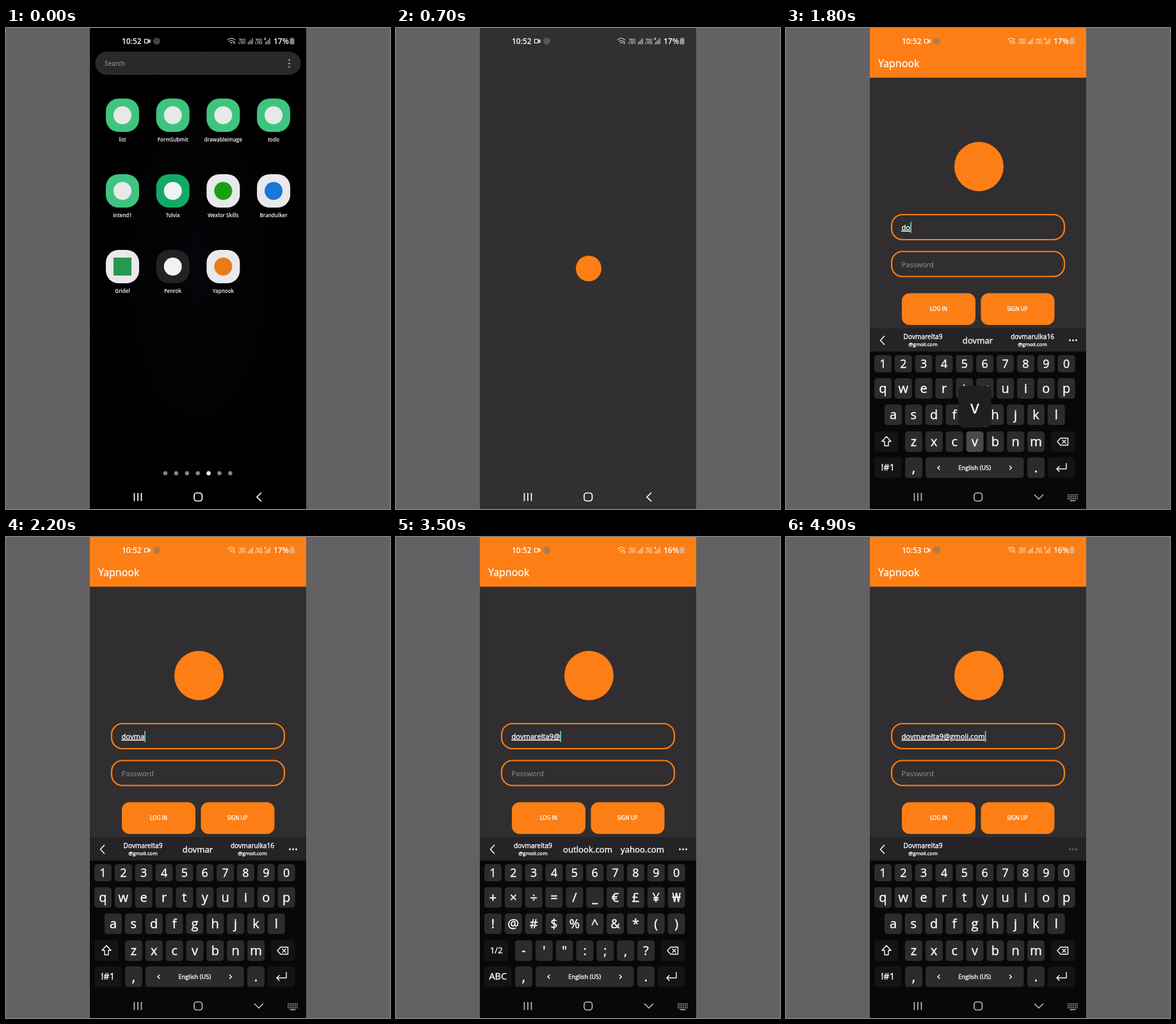
Write an HTML page that moves like this. It is 600 px wide and 750 px high and loops after 5 s.

```html
<!DOCTYPE html>
<html lang="en">
<head>
<meta charset="utf-8">
<title>Login demo</title>
<style>
  html, body { margin: 0; width: 100%; height: 100%; overflow: hidden; background: #636163; }
  svg { display: block; width: 600px; height: 750px; font-family: "Open Sans", "Noto Sans", sans-serif; fill: #fff; }
  .mid { text-anchor: middle; }
  .medium text, text.medium { stroke: #fff; stroke-width: .35; }
  .line { fill: none; stroke: #fff; stroke-linecap: round; stroke-linejoin: round; }
  .orange { fill: #fd7e14; }
  .hint { fill: #979699; }
  .field { fill: none; stroke: #fd7e14; stroke-width: 2.2; }
  .key { fill: #2c2c2f; }
  .key.dark { fill: #141416; }
  .key.down { fill: #4a4a4d; }

  #home, #splash, #splashDot, #login, #keyboard, #nav, #backArrow, #downArrow {
    animation: 5s linear infinite;
  }
  #home { transform-origin: 300px 375px; animation-name: recede; }
  #splash { animation-name: open; }
  #splashDot { animation-name: settle; }
  #login { animation-name: appear; }
  #keyboard { animation-name: rise; }
  #nav { animation-name: soften; }
  #backArrow { animation-name: untilKeyboard; }
  #downArrow { animation-name: withKeyboard; }

  @keyframes recede {
    0%, 4% { transform: none; opacity: 1; }
    10% { transform: scale(.983); opacity: .71; }
    12%, 100% { transform: scale(.97); opacity: .5; }
  }
  @keyframes open {
    0%, 6% { x: 313.5px; y: 346px; width: 52px; height: 52px; rx: 20px; opacity: 0; }
    7% { opacity: 1; }
    10% { x: 253px; y: 299px; width: 147px; height: 147px; rx: 58px; }
    12%, 100% { x: 131px; y: 0; width: 338px; height: 750px; rx: 0; opacity: 1; }
  }
  @keyframes settle {
    0%, 6% { cx: 339.5px; cy: 372px; r: 5px; opacity: 0; }
    7% { opacity: 1; }
    10% { cx: 327px; cy: 373px; r: 9px; }
    12% { cx: 301px; cy: 375px; r: 16px; }
    14%, 100% { cx: 301px; cy: 375px; r: 20px; opacity: 1; }
  }
  @keyframes appear {
    0%, 17% { opacity: 0; }
    22%, 100% { opacity: 1; }
  }
  @keyframes rise {
    0%, 26.2% { transform: translateY(284px); }
    27.2%, 100% { transform: none; }
  }
  @keyframes soften {
    0%, 17% { opacity: 1; }
    20%, 100% { opacity: .72; }
  }
  @keyframes untilKeyboard {
    0%, 27.1% { opacity: 1; }
    27.2%, 100% { opacity: 0; }
  }
  @keyframes withKeyboard {
    0%, 27.1% { opacity: 0; }
    27.2%, 100% { opacity: 1; }
  }
</style>
</head>
<body>
<svg viewBox="0 0 600 750">
  <defs>
    <clipPath id="screen"><rect x="131" width="338" height="750"/></clipPath>
    <radialGradient id="night"><stop stop-color="#050509"/><stop offset="1" stop-color="#000"/></radialGradient>
  </defs>
  <rect width="600" height="750" fill="#636163"/>
  <g clip-path="url(#screen)">
    <rect x="131" width="338" height="750" fill="url(#night)"/>

    <g id="home">
      <rect x="139.5" y="37" width="321" height="36" rx="18" fill="#29282b"/>
      <text x="154" y="58.5" font-size="9.8" font-weight="600" fill="#8b8a8d">Search</text>
      <g fill="#aaa"><circle cx="442.5" cy="50" r="1.3"/><circle cx="442.5" cy="55.3" r="1.3"/><circle cx="442.5" cy="60.6" r="1.3"/></g>
      <g id="apps" class="mid" font-size="8" font-weight="600"></g>
      <g id="dots"></g>
    </g>

    <rect id="splash" fill="#312f32"/>
    <circle id="splashDot" class="orange"/>

    <g id="login">
      <rect x="131" width="338" height="750" fill="#302e30"/>
      <rect x="131" width="338" height="77.5" class="orange"/>
      <rect x="131" y="711" width="338" height="39" fill="#000"/>
      <text class="medium" x="144" y="61" font-size="16">Yapnook</text>
      <circle cx="301.5" cy="216" r="38.5" class="orange"/>
      <rect class="field" x="165" y="291" width="270" height="39" rx="17"/>
      <rect class="field" x="165" y="348.5" width="270" height="39" rx="17"/>
      <text id="emailHint" class="hint" x="180.5" y="315" font-size="11.5">Email</text>
      <text id="email" class="medium" x="180.5" y="315" font-size="11.2" text-decoration="underline"></text>
      <rect id="cursor" y="302.5" width="1.6" height="17" fill="#80d6c8"/>
      <text class="hint" x="180.5" y="372.5" font-size="11.2">Password</text>
      <g class="mid medium" font-size="8.2">
        <rect class="orange" x="181" y="413.5" width="115" height="49.5" rx="12"/>
        <rect class="orange" x="304.5" y="413.5" width="115" height="49.5" rx="12"/>
        <text x="238.5" y="441">LOG IN</text>
        <text x="361.5" y="441">SIGN UP</text>
      </g>
    </g>

    <g id="keyboard" class="mid medium">
      <rect x="131" y="468" width="338" height="282" fill="#08080a"/>
      <rect x="131" y="468" width="338" height="36.5" fill="#242426"/>
      <path id="stripBack" class="line" stroke-width="1.5" d="M153.5 480.5l-6 6.5 6 6.5"/>
      <g id="more"><circle cx="443.5" cy="487" r="1.4"/><circle cx="448.5" cy="487" r="1.4"/><circle cx="453.5" cy="487" r="1.4"/></g>
      <g id="suggestions"></g>
      <g id="letters"></g>
      <g id="symbols"></g>
      <g id="popup">
        <rect x="-25.5" width="51" height="65" rx="8" fill="#1f1f21"/>
        <text id="popupText" y="43" font-size="27"></text>
      </g>
    </g>

    <g id="status" font-weight="600">
      <text id="clock" x="181" y="25" font-size="12"></text>
      <path class="line" stroke-width="1.2" d="M216.5 17.5h5.5v6h-5.5zM222.5 20l2.5-1.7v4.4l-2.5-1.7"/>
      <circle cx="235.5" cy="20.5" r="5.5" fill="#777" opacity=".55"/>
      <g opacity=".88">
        <path class="line" stroke-width="1.1" d="M346.5 18.3q5.5-4.6 11 0M348.5 20.9q3.5-2.9 7 0M350.6 23.2q1.4-1.2 2.8 0"/>
        <path d="M355 22.5l1.5-2 1.5 2zM355 23.3h3l-1.5 2z"/>
        <path class="line" stroke-width="1" stroke-linecap="butt" d="M378.5 25v-2.5M380.7 25v-4.5M382.9 25v-6.5M385.1 25v-9M405.5 25v-2.5M407.7 25v-4.5M409.9 25v-6.5M412.1 25v-9"/>
      </g>
      <g class="mid" font-size="5.2">
        <text x="369" y="19.5">Vo))</text><text x="369" y="25.2">LTE1</text>
        <text x="395" y="19.5">Vo))</text><text x="395" y="25.2">LTE2</text>
        <text x="405" y="18.5">R</text>
      </g>
      <text id="battery" x="418" y="25" font-size="12"></text>
      <path fill="#ccc" opacity=".65" d="M443.5 16.5h2v-1.5h3v1.5h2v9h-7z"/>
    </g>

    <g id="nav" class="line" stroke-width="1.7">
      <path stroke-linecap="butt" d="M200.5 725v12.5M206 725v12.5M211.5 725v12.5"/>
      <rect x="294" y="725" width="12.5" height="12.5" rx="4"/>
      <path id="backArrow" d="M398.5 725l-6.5 6.3 6.5 6.3"/>
      <g id="downArrow">
        <path d="M388.5 728l6.5 6.5 6.5-6.5"/>
        <path stroke-width="1.6" stroke-linecap="butt" stroke-dasharray="1.7 1.1" d="M440 728h16M440 731h16M440 734h16"/>
        <path stroke-width="1.3" d="M444 737h8"/>
      </g>
    </g>
  </g>
</svg>
<script>
const $ = id => document.getElementById(id);

function add(parent, tag, attrs, text = '') {
  const node = document.createElementNS('http://www.w3.org/2000/svg', tag);
  for (const name in attrs) node.setAttribute(name, attrs[name]);
  node.textContent = text;
  return parent.appendChild(node);
}

// Home screen: label, tile colour, badge colour
const green = ['#3fc480', '#e6e9e7'];
const white = '#e9e9eb';
const apps = [
  ['list', ...green], ['FormSubmit', ...green], ['drawableimage', ...green], ['todo', ...green],
  ['intend1', ...green], ['Tolvix', '#13aa68', '#f0f3f1'], ['Wexlor Skills', white, '#18a012'],
  ['Brandulker', white, '#1878d8'], ['Gridel', white, '#27984f'], ['Fenrok', '#222225', '#f2f2f2'],
  ['Yapnook', white, '#ec7a1c']
];
apps.forEach(([label, tile, badge], i) => {
  const x = 182 + (i % 4) * 78.7, y = 136 + Math.floor(i / 4) * 118;
  add($('apps'), 'rect', { x: x - 26, y: y - 26, width: 52, height: 52, rx: 20, fill: tile });
  if (label === 'Gridel') add($('apps'), 'rect', { x: x - 14, y: y - 14, width: 28, height: 28, fill: badge });
  else add($('apps'), 'circle', { cx: x, cy: y, r: 14, fill: badge });
  add($('apps'), 'text', { x, y: y + 40.5 }, label);
});
for (let i = 0; i < 7; i++) {
  add($('dots'), 'circle', { cx: 249 + i * 16.9, cy: 694.3, r: 3.2, fill: i === 4 ? '#fff' : '#858587' });
}

// Keyboard pages
const pages = { letters: {}, symbols: {} };

function addKey(page, label, x, y, width, height, size, dark) {
  const cx = x + width / 2;
  const rect = add($(page), 'rect', { class: dark ? 'key dark' : 'key', x, y, width, height, rx: 4.5 });
  add($(page), 'text', { x: cx, y: y + height / 2 + size * .34, 'font-size': size }, label);
  pages[page][label] = { rect, cx, y };
}

function addRow(page, labels, x, y, height, size) {
  [...labels].forEach((label, i) => addKey(page, label, x + i * 31.85, y, 27, height, size));
}

function addIcon(page, d) {
  add($(page), 'path', { class: 'line', 'stroke-width': 1.4, d });
}

function buildPage(page, rows, thirdX, toggle) {
  addRow(page, '1234567890', 138, 510, 27, 18);
  addRow(page, rows[0], 138, 546, 32, 20);
  addRow(page, rows[1], thirdX, 587, 32, 20);
  addKey(page, page === 'symbols' ? '1/2' : '', 138, 629, 37.5, 32, 13, true);
  addRow(page, rows[2], 186, 629, 32, 20);
  addKey(page, ' ', 414, 629, 37.5, 32, 12, true);
  addKey(page, toggle, 138, 669.5, 42.5, 32, 14.5, true);
  addKey(page, ',', 186, 669.5, 27, 32, 22);
  addKey(page, 'English (US)', 218, 669.5, 153.5, 32, 9.4);
  addKey(page, '.', 377, 669.5, 27, 32, 22);
  addKey(page, '  ', 409, 669.5, 42.5, 32, 12, true);
  addIcon(page, 'M240 683l-3 2.8 3 2.8M349.5 683l3 2.8-3 2.8');
  addIcon(page, 'M429 639.5h11.5v11h-11.5l-5-5.5zM432 642.5l5 5M437 642.5l-5 5');
  addIcon(page, 'M438 679v8.5h-15M427 683.5l-4 4 4 4');
  if (page === 'letters') addIcon(page, 'M157 637l7 7.5h-4v7h-6v-7h-4z');
}
buildPage('letters', ['qwertyuiop', 'asdfghjkl', 'zxcvbnm'], 154, '!#1');
buildPage('symbols', ['+×÷=/_€£¥₩', '!@#$%^&*()', '-\'":;,?'], 138, 'ABC');

// Typing: start time, number of characters shown, key held down
const user = 'dovmarelta9', domain = '@gmoli.com', address = user + domain;
const steps = [
  [0, 0], [1500, 0, 'd'], [1600, 1], [1700, 1, 'o'], [1800, 2, 'v'], [1900, 3, 'm'], [2000, 4],
  [2100, 4, 'a'], [2200, 5], [2300, 5, 'r'], [2400, 6, 'e'], [2500, 7, 'l'], [2600, 8, 't'],
  [2700, 9, 'a'], [2800, 10], [2900, 10, '9'], [3000, 11], [3100, 11, '!#1'], [3200, 11],
  [3500, 12], [3700, 12, 'ABC'], [3800, 12], [3900, 12, 'g'], [4000, 13], [4100, 13, 'm'],
  [4200, 14, 'o'], [4300, 15, 'l'], [4400, 16, 'i'], [4500, 17, '.'],
  [4600, 18, 'c'], [4700, 19, 'o'], [4800, 20, 'm'], [4900, 21]
];

function suggestionsFor(count) {
  const full = ['D' + user.slice(1), domain];
  if (!count) return [];
  if (count < 7) return [full, ['dovmar'], ['dovmarulka16', domain]];
  if (count === 12 || count === 13) return [[user, domain], ['outlook.com'], ['yahoo.com']];
  return [full];
}

function showSuggestions(count) {
  const list = suggestionsFor(count);
  $('suggestions').replaceChildren();
  list.forEach(([main, sub], i) => {
    const x = 214 + i * 85.5;
    add($('suggestions'), 'text', { x, y: sub ? 485 : 491.5, 'font-size': sub ? 10.2 : 13.2 }, main);
    if (sub) add($('suggestions'), 'text', { x, y: 496, 'font-size': 7.9 }, sub);
  });
  $('stripBack').setAttribute('opacity', count ? 1 : 0);
  $('more').setAttribute('opacity', list.length === 1 ? .35 : 1);
}

let heldKey;
function showStep([, count, label], page) {
  $('email').textContent = address.slice(0, count);
  $('emailHint').setAttribute('opacity', count ? 0 : 1);
  $('cursor').setAttribute('x', 180.7 + (count ? $('email').getComputedTextLength() : 0));
  showSuggestions(count);
  heldKey?.rect.classList.remove('down');
  heldKey = pages[page][label];
  heldKey?.rect.classList.add('down');
  const popped = heldKey && /^\w$/.test(label);
  $('popup').setAttribute('visibility', popped ? 'visible' : 'hidden');
  if (popped) {
    $('popup').setAttribute('transform', `translate(${heldKey.cx} ${heldKey.y - 71})`);
    $('popupText').textContent = label;
  }
}

// Scripted states switch slightly early, so a late paint still shows them on time.
const lead = 70;
const timeline = $('home').getAnimations()[0];
let shown;
function draw() {
  const t = Math.min((timeline.currentTime || 0) % 5000 + lead, 4999);
  const step = steps.findLast(([start]) => t >= start);
  const page = t >= 3300 && t < 3800 ? 'symbols' : 'letters';
  for (const name in pages) $(name).setAttribute('visibility', name === page ? 'visible' : 'hidden');
  $('clock').textContent = t < 3700 ? '10:52' : '10:53';
  $('battery').textContent = t < 2700 ? '17%' : '16%';
  if (step !== shown) showStep(shown = step, page);
  requestAnimationFrame(draw);
}
draw();
</script>
</body>
</html>
```
